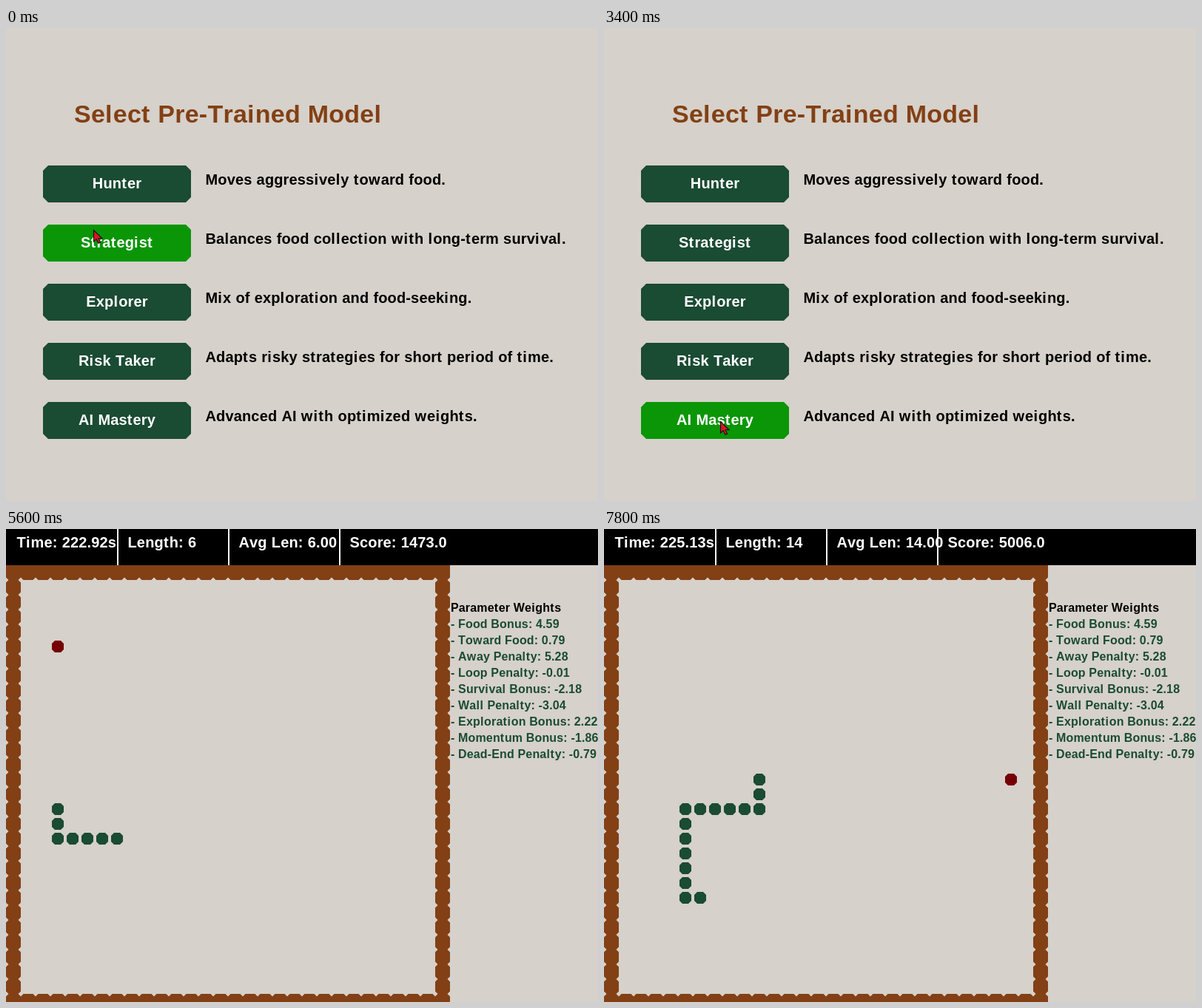
Recreate the animation shown at these times as an HTML page. Size 800 by 640 pixels, loop 8000 ms.

```html
<!DOCTYPE html>
<html lang="en">
<head>
<meta charset="utf-8">
<title>Snake model picker</title>
<style>
  html, body { margin: 0; width: 100%; height: 100%; overflow: hidden; background: #d6d1ca; }
  svg { display: block; width: 800px; height: 640px; }
  text {
    font: bold 20px "Liberation Sans", Arial, sans-serif;
    font-kerning: none;
    letter-spacing: .15px;
    word-spacing: .4px;
  }
  .thin { letter-spacing: 1.15px; }
  .title { font-size: 34px; letter-spacing: .25px; word-spacing: 0; fill: #834015; }
  .title .thin { letter-spacing: 1.2px; }
  .light { fill: #fff; }
  .side { font-size: 16px; letter-spacing: .15px; word-spacing: 0; }
  .side .thin { letter-spacing: .75px; }
  .green { fill: #1a4b33; }
  .brown { fill: #834015; }
  .ground { fill: #d6d1ca; }
</style>
</head>
<body>
<svg viewBox="0 0 800 640">
  <rect class="ground" width="800" height="640"/>
  <g id="menu"></g>
  <g id="game">
    <rect class="brown" y="49" width="600" height="591"/>
    <rect class="ground" x="20" y="69" width="560" height="560"/>
    <path class="ground" id="notches"/>
    <rect width="800" height="49"/>
    <path d="M151 0V49M301 0V49M451 0V49" stroke="#fff" stroke-width="2"/>
    <g id="stats"></g>
    <g id="weights"></g>
    <path id="food" fill="#750003"/>
    <path id="snake" class="green"/>
  </g>
  <path id="cursor" d="M.5 .5V16L4.2 12.7 6.8 18.3 9.6 17.2 7.2 11.8H12Z" fill="#dc1428" stroke="#111" stroke-width="1.1"/>
</svg>
<script>
const LOOP = 8000, TICK = 200, GAME_START = 3600, CURSOR_END = 4400;
const $ = id => document.getElementById(id);

function add(parent, tag, attrs) {
  const el = document.createElementNS("http://www.w3.org/2000/svg", tag);
  for (const key in attrs) el.setAttribute(key, attrs[key]);
  return parent.appendChild(el);
}

// Narrow glyphs sit a little looser than the rest.
function setText(el, text) {
  el.innerHTML = text.replace(/[iltw]/g, '<tspan class="thin">$&</tspan>');
}

function addText(parent, text, x, y, cls = "", anchor = "start") {
  const el = add(parent, "text", { x, y, class: cls, "text-anchor": anchor });
  setText(el, text);
  return el;
}

// Rectangle with its corners cut off.
function octagon(x, y, w, h, cut) {
  return `M${x + cut} ${y}h${w - 2 * cut}l${cut} ${cut}v${h - 2 * cut}l${-cut} ${cut}` +
    `h${2 * cut - w}l${-cut} ${-cut}v${2 * cut - h}z`;
}

// Menu
const buttonTop = i => 186 + 80 * i;
addText($("menu"), "Select Pre-Trained Model", 92, 127.5, "title");
const buttons = [
  ["Hunter", "Moves aggressively toward food."],
  ["Strategist", "Balances food collection with long-term survival."],
  ["Explorer", "Mix of exploration and food-seeking."],
  ["Risk Taker", "Adapts risky strategies for short period of time."],
  ["AI Mastery", "Advanced AI with optimized weights."]
].map(([name, about], i) => {
  const y = buttonTop(i);
  const button = add($("menu"), "path", { d: octagon(50, y, 200, 50, 7) });
  addText($("menu"), name, 150, y + 31, "light", "middle");
  addText($("menu"), about, 269.5, y + 26);
  return button;
});

// Board
const diamond = (x, y) => `M${x - 3.5} ${y}l3.5-3.5 3.5 3.5-3.5 3.5z`;
let notchPath = "";
for (let i = 0; i <= 28; i++) {
  for (const x of [0, 20, 580, 600]) notchPath += diamond(x, 69 + 20 * i);
  for (const y of [69, 629]) notchPath += diamond(20 + 20 * i, y);
}
$("notches").setAttribute("d", notchPath);

addText($("weights"), "Parameter Weights", 601, 112, "side");
["Food Bonus: 4.59", "Toward Food: 0.79", "Away Penalty: 5.28", "Loop Penalty: -0.01",
 "Survival Bonus: -2.18", "Wall Penalty: -3.04", "Exploration Bonus: 2.22",
 "Momentum Bonus: -1.86", "Dead-End Penalty: -0.79"
].forEach((line, i) => addText($("weights"), "- " + line, 601, 134 + 22 * i, "side green"));

const stats = [0, 1, 2, 3].map(i => addText($("stats"), "", 14.5 + 150 * i, 25, "light"));

// The snake heads for each food in turn, sideways first, then up or down.
const foods = [
  [4, 15], [2, 7], [16, 21], [24, 9], [12, 22], [20, 18], [3, 5], [9, 19],
  [14, 18], [17, 4], [14, 13], [8, 22], [5, 16], [10, 14], [27, 14]
];
const trail = [[15, 15]];
const eatenAt = foods.map(([fx, fy]) => {
  let [x, y] = trail[trail.length - 1];
  while (x !== fx || y !== fy) {
    if (x !== fx) x += Math.sign(fx - x);
    else y += Math.sign(fy - y);
    trail.push([x, y]);
  }
  return trail.length - 1;
});

const cellPath = ([x, y]) => octagon(2 + 20 * x, 51 + 20 * y, 16, 16, 4);

// Linear interpolation between [time, a, b] key points.
function sample(keys, t) {
  const last = keys.length - 1;
  const i = Math.min(last, Math.max(1, keys.findIndex(key => t < key[0]) + 1 || last + 1) - 1 || 1);
  const from = keys[i - 1], to = keys[i];
  const u = Math.min(1, Math.max(0, (t - from[0]) / (to[0] - from[0])));
  return [1, 2].map(k => from[k] + (to[k] - from[k]) * u);
}

const pointerKeys = [[0, 118, 273], [600, 136, 384], [1400, 157, 532]];
const stepAndScoreKeys = [[3600, 2, 2], [5600, 125, 1473], [7000, 167, 3332], [7800, 222, 5006]];

function drawMenu(y) {
  buttons.forEach((button, i) => {
    const hover = y >= buttonTop(i) && y < buttonTop(i) + 50;
    button.setAttribute("fill", hover ? "#0a9606" : "#1a4b33");
  });
}

function drawGame(t) {
  const [step, score] = sample(stepAndScoreKeys, t).map(Math.round);
  const length = eatenAt.filter(at => at <= step).length;
  const body = trail.slice(Math.max(0, step - length), step + 1);
  $("snake").setAttribute("d", body.map(cellPath).join(""));
  $("food").setAttribute("d", cellPath(foods[length]));
  const seconds = 220.91 + (t - GAME_START) * 1.0042 / 1000;
  [`Time: ${seconds.toFixed(2)}s`, `Length: ${length}`, `Avg Len: ${length.toFixed(2)}`,
   `Score: ${score.toFixed(1)}`].forEach((text, i) => setText(stats[i], text));
}

function draw(t) {
  const playing = t >= GAME_START;
  const [x, y] = sample(pointerKeys, t).map(Math.round);
  $("menu").style.display = playing ? "none" : "";
  $("game").style.display = playing ? "" : "none";
  $("cursor").style.display = t < CURSOR_END ? "" : "none";
  $("cursor").setAttribute("transform", `translate(${x} ${y})`);
  if (playing) drawGame(t); else drawMenu(y);
}

const start = performance.now();
let shown = -1;
function frame() {
  const t = Math.floor((performance.now() - start) % LOOP / TICK) * TICK;
  if (t !== shown) draw(shown = t);
  requestAnimationFrame(frame);
}
frame();
</script>
</body>
</html>
```
